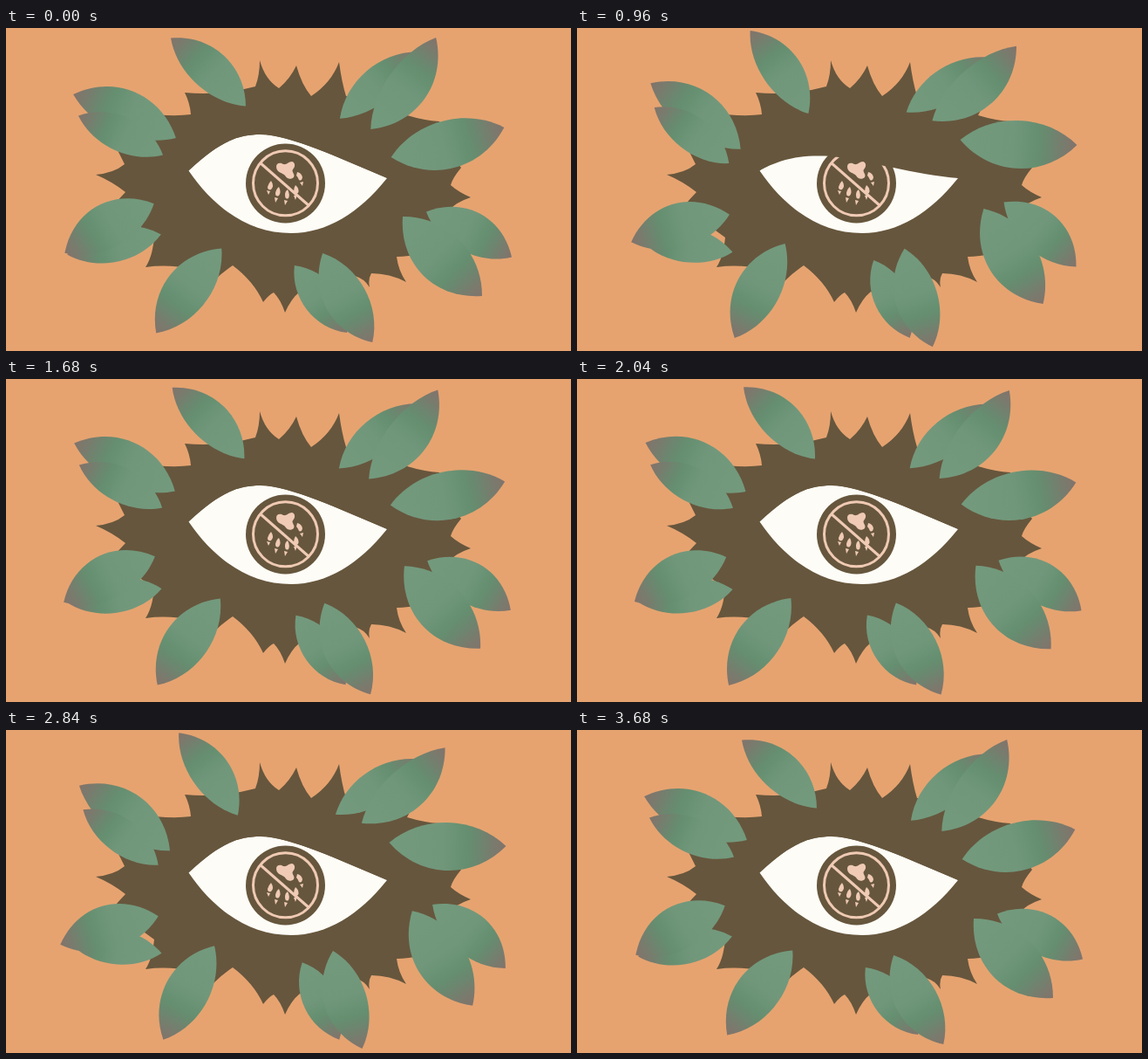
Recreate the animation shown at these times as an HTML page. Size 648 px wide and 370 px high, loop 3840 ms.

```html
<!DOCTYPE html>
<html lang="en">
<head>
<meta charset="utf-8">
<title>Watching eye</title>
<style>
  html, body { margin: 0; width: 100%; height: 100%; overflow: hidden; background: #e6a370; }
  svg { display: block; width: 648px; height: 370px; }
  .brown { fill: #66563d; }
  .pink { fill: #f0cab4; }
  .line { fill: none; stroke: #f0cab4; stroke-width: 3; }
</style>
</head>
<body>
<svg viewBox="0 0 648 370">
  <defs>
    <linearGradient id="green">
      <stop offset="0" stop-color="#739a7d"/>
      <stop offset=".45" stop-color="#71977b"/>
      <stop offset=".66" stop-color="#658f70"/>
      <stop offset=".75" stop-color="#6a886f"/>
      <stop offset=".9" stop-color="#7a7a6d"/>
      <stop offset="1" stop-color="#82736b"/>
    </linearGradient>
  </defs>

  <path class="brown" d="M291 37Q297 59 313 69Q326 58 333 43Q339 65 350 78Q373 63 382 39Q385 62 390 78
    L463 94L460 100Q480 106 497 107Q505 140 522 160Q512 172 510 180Q519 188 533 194Q515 200 507 210
    L480 258Q460 262 448 262Q450 278 459 291Q440 281 419 281Q415 288 417 297Q411 287 400 284
    L345 305L337 302Q327 310 320 326Q315 311 307 303Q301 306 295 314Q284 290 260 272Q248 280 238 290
    L215 277Q188 270 160 274Q168 262 170 240L122 205Q130 195 137 188Q122 176 103 168Q124 166 136 156
    L128 140L150 97Q190 102 212 99Q211 86 205 74Q245 78 286 67Q291 54 291 37Z"/>

  <path fill="#fefcf6" d="M209.500 163.500C245 130 266 122 292 122C325 122 385 150 437 172
    C405 212 368 235 327 235C280 235 240 208 209.500 163.500Z"/>
  <circle class="brown" cx="320.500" cy="178" r="45.500"/>
  <g class="pink">
    <path d="M310 159C310 154 315 154 318 156C322 157 324 153 328 153C332 154 332 159 329 162
      C327 165 332 167 330 171C327 174 322 173 320 169C318 166 310 166 310 159Z"/>
    <path d="M304 175Q308 181 304 185Q300 186 300 182Q301 178 304 175Z
      M313 182Q316 188 313 192Q309 194 309 189Q310 184 313 182Z
      M323 185Q326 191 324 195Q320 197 320 191Q320 187 323 185Z
      M332 180Q337 184 335 189Q331 192 330 187Q330 183 332 180Z
      M334 165Q339 166 340 171Q339 176 336 174Q335 171 333 169Z"/>
    <path d="M299 186L303 187L301 191ZM308 194L312 195L309 200ZM319 197L323 198L320 203Z
      M330 192L334 191L332 197ZM337 177L341 176L340 181Z"/>
  </g>
  <circle class="line" cx="320.500" cy="177.800" r="37"/>
  <path class="line" d="M291 154L348 204"/>
  <path class="brown" id="lid"/>
  <g id="leaves" fill="url(#green)"></g>
</svg>
<script>
const STEP = 40, LOOP = 3840, LAST = 3680, SWAY = 920;
const BLINK_AT = 680, BLINK_HALF = 360;

// centre x, centre y, length, angle, swing, bulge on either side
const LEAVES = [
  [232, 50.5, 116, -137.8, 13.3, 19, 26],
  [136, 101, 128, -157, 13.8, 20, 30],
  [131.5, 123, 107, -155, 12.4, 18, 22],
  [428.5, 65.5, 119, -40, 9, 22, 18],
  [455.7, 63.5, 129, -54.5, 13.6, 18, 30],
  [506.5, 131, 134, -14.7, 18, 25, 30],
  [531, 236.5, 111, 28, 14.3, 27, 20],
  [500.5, 261.5, 128.6, 45, 13.6, 27, 31],
  [361, 310.5, 98, 52, 13.5, 20, 20],
  [391.7, 309, 117, 60.8, 13.8, 22, 27],
  [209.7, 301, 122.6, 127.7, -10, 23, 28],
  [124, 248, 110, 168, 22, 20, 20],
  [118.5, 229.5, 117, 151, 14.1, 22, 29]
];

// lid curve: open, and a little over half shut
const OPEN = [245, 130, 266, 122, 292, 122, 325, 122, 385, 150];
const HALF = [232, 172, 262, 181, 292, 184.5, 345, 196, 395, 196];

const lid = document.getElementById('lid');
const group = document.getElementById('leaves');

const leaves = LEAVES.map(([x, y, length, angle, swing, a, b]) => {
  const path = document.createElementNS('http://www.w3.org/2000/svg', 'path');
  const h = length / 2, c = h * 0.45, top = -a / 0.75, bottom = b / 0.75;
  path.setAttribute('d', `M${-h} 0C${-c} ${top} ${c} ${top} ${h} 0C${c} ${bottom} ${-c} ${bottom} ${-h} 0Z`);
  group.append(path);
  return sway => path.setAttribute('transform',
    `translate(${x} ${y}) rotate(${angle + swing * sway})`);
});

function draw(t) {
  const sway = 1 - Math.abs((t / SWAY) % 2 - 1);
  leaves.forEach(turn => turn(sway));

  const shut = 1.8 * Math.max(0, 1 - Math.abs(t - BLINK_AT) / BLINK_HALF);
  const p = OPEN.map((v, i) => v + (HALF[i] - v) * shut);
  lid.setAttribute('d', `M209 163.5C${p.slice(0, 6)}C${p.slice(6)} 437.5 172V115H209Z`);
}

function tick() {
  const t = performance.now() % LOOP;
  draw(Math.min(LAST, Math.floor(t / STEP) * STEP));
  requestAnimationFrame(tick);
}
tick();
</script>
</body>
</html>
```
